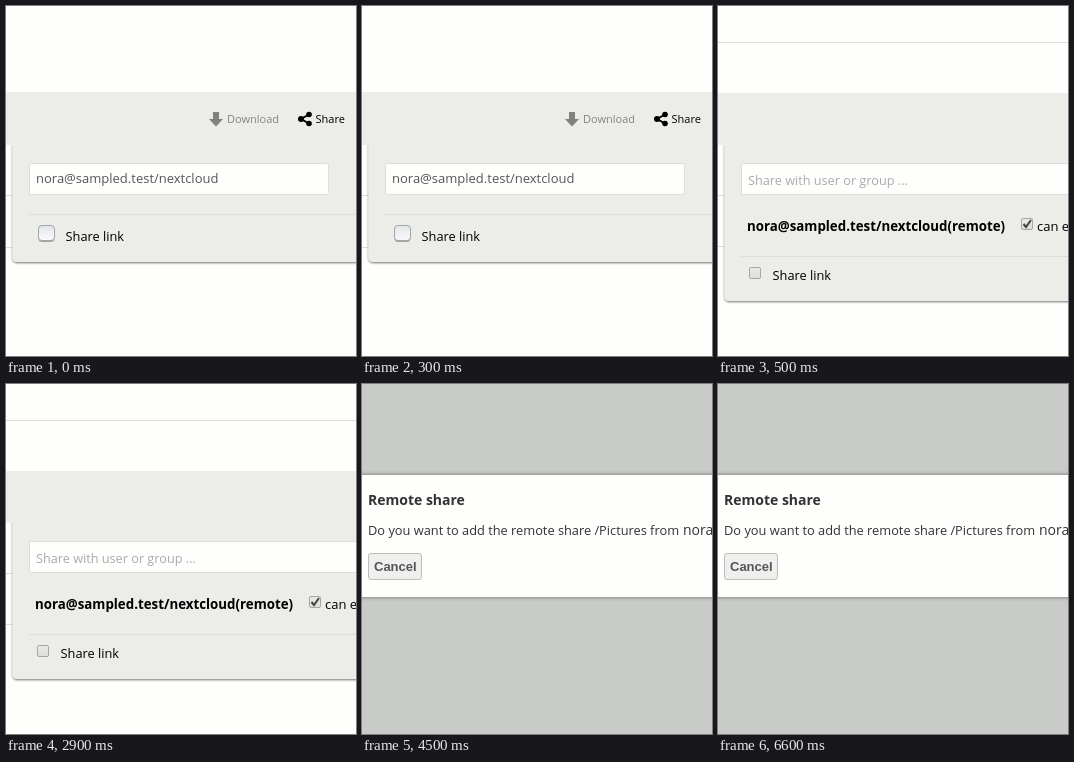
These frames come from a looping animation (350x350 px, 8000 ms). An HTML page:

```html
<!DOCTYPE html>
<html lang="en">
<head>
<meta charset="utf-8">
<title>Remote sharing</title>
<style>
  html, body { margin: 0; width: 100%; height: 100%; overflow: hidden; background: #fefefd; }
  svg { display: block; width: 100vw; height: 100vh; }
  text { font: 13px "Open Sans", sans-serif; fill: #000; white-space: pre; }
  .small { font-size: 11px; }
  .bold { font-weight: 700; }
  .rule { fill: #dcdedb; }
  .panel { fill: #ecede9; }
  .field { fill: #fefefd; stroke: #dcdedb; }
</style>
</head>
<body>
<svg viewBox="0 0 350 350">
  <defs>
    <linearGradient id="box" x2="0" y2="1">
      <stop stop-color="#e2e5e6"/><stop offset="1" stop-color="#f8fafb"/>
    </linearGradient>
    <linearGradient id="smallBox" x2="0" y2="1">
      <stop stop-color="#e9ebe9"/><stop offset="1" stop-color="#dcdedc"/>
    </linearGradient>
    <filter id="shadow" x="-10%" y="-10%" width="120%" height="125%">
      <feDropShadow dx="0" dy="1" stdDeviation="1" flood-color="#000" flood-opacity=".55"/>
    </filter>
    <filter id="glow" x="-10%" y="-15%" width="120%" height="130%">
      <feDropShadow dx="0" dy="0" stdDeviation="2" flood-color="#333" flood-opacity=".65"/>
    </filter>
  </defs>

  <g class="scene">
    <rect width="350" height="350" fill="#fefefd"/>
    <path class="rule" d="M0 189h7v1H0zM0 241h7v1H0z"/>
    <path class="panel" filter="url(#shadow)" d="M6.500 130H370V256H11.500Q6.500 256 6.500 251Z"/>
    <rect class="panel" y="86" width="350" height="53"/>
    <path fill="#80827f" d="M207 106h6v7h4l-7 7.500l-7-7.500h4z"/>
    <text class="small" x="221" y="117" style="fill:#848683">Download</text>
    <g fill="#000">
      <path d="M303 108.500L295 113L303 117.500" fill="none" stroke="#000" stroke-width="2"/>
      <circle cx="303" cy="108.500" r="2.800"/>
      <circle cx="295" cy="113" r="3"/>
      <circle cx="303" cy="117.500" r="2.800"/>
    </g>
    <text class="small" x="309.500" y="117">Share</text>
    <rect class="field" x="23.500" y="157.500" width="299" height="31" rx="2"/>
    <text x="30" y="177" style="fill:#555">nora@sampled.test/nextcloud</text>
    <rect class="rule" x="23" y="208" width="327" height="1"/>
    <rect x="32.500" y="220" width="16" height="16" rx="3.500" fill="#777" opacity=".6"/>
    <rect x="32.500" y="219.500" width="16" height="15" rx="3.500" fill="url(#box)" stroke="#a3a6a7"/>
    <text x="59.500" y="235" style="font-size:12.800px">Share link</text>
  </g>

  <g class="scene">
    <rect width="350" height="350" fill="#fefefd"/>
    <path class="rule" d="M0 36h350v1H0zM0 189h7v1H0zM0 240h7v1H0z"/>
    <path class="panel" filter="url(#shadow)" d="M6.500 130H370V295H11.500Q6.500 295 6.500 290Z"/>
    <rect class="panel" y="87" width="350" height="52"/>
    <rect class="field" x="23.500" y="157.500" width="340" height="31" rx="2"/>
    <text x="30" y="179" style="font-size:12.700px;fill:#aaa">Share with user or group ...</text>
    <text class="bold" x="29" y="225" style="font-size:13.300px">nora@sampled.test/nextcloud(remote)</text>
    <rect x="303.500" y="212.500" width="11" height="11" rx="1.500" fill="url(#smallBox)" stroke="#a5a7a5"/>
    <path d="M305.500 218l2.500 3l5-7" fill="none" stroke="#444" stroke-width="2"/>
    <text x="319" y="225">can edit</text>
    <rect class="rule" x="23" y="250" width="327" height="1"/>
    <rect x="31.500" y="261.500" width="11" height="11" rx="1.500" fill="url(#smallBox)" stroke="#a5a7a5"/>
    <text x="54.500" y="274" style="font-size:12.800px">Share link</text>
  </g>

  <g class="scene">
    <rect width="350" height="350" fill="#c9cbc8"/>
    <rect x="-20" y="91" width="390" height="122" fill="#fefefd" filter="url(#glow)"/>
    <text class="bold" x="6" y="121" style="font-size:14px;fill:#333">Remote share</text>
    <text x="6" y="151" style="font-size:12.800px;fill:#333">Do you want to add the remote share /Pictures from</text>
    <text x="321" y="151" style="font-size:14px;fill:#333">nora</text>
    <rect x="6.500" y="169.500" width="53" height="26" rx="2.500" fill="#efefee" stroke="#bcbebb"/>
    <text class="bold" x="12" y="187" style="font-family:'Liberation Sans',sans-serif;fill:#555">Cancel</text>
  </g>
</svg>
<script>
  const duration = 8000;
  const starts = [0, 500, 4500];

  // Each scene covers the ones before it, so the first can stay visible.
  document.querySelectorAll(".scene").forEach((scene, i) => {
    if (i === 0) return;
    scene.animate(
      [
        { offset: 0, opacity: 0, easing: "steps(1, end)" },
        { offset: starts[i] / duration, opacity: 1 },
        { offset: 1, opacity: 1 }
      ],
      { duration, iterations: Infinity }
    );
  });
</script>
</body>
</html>
```
